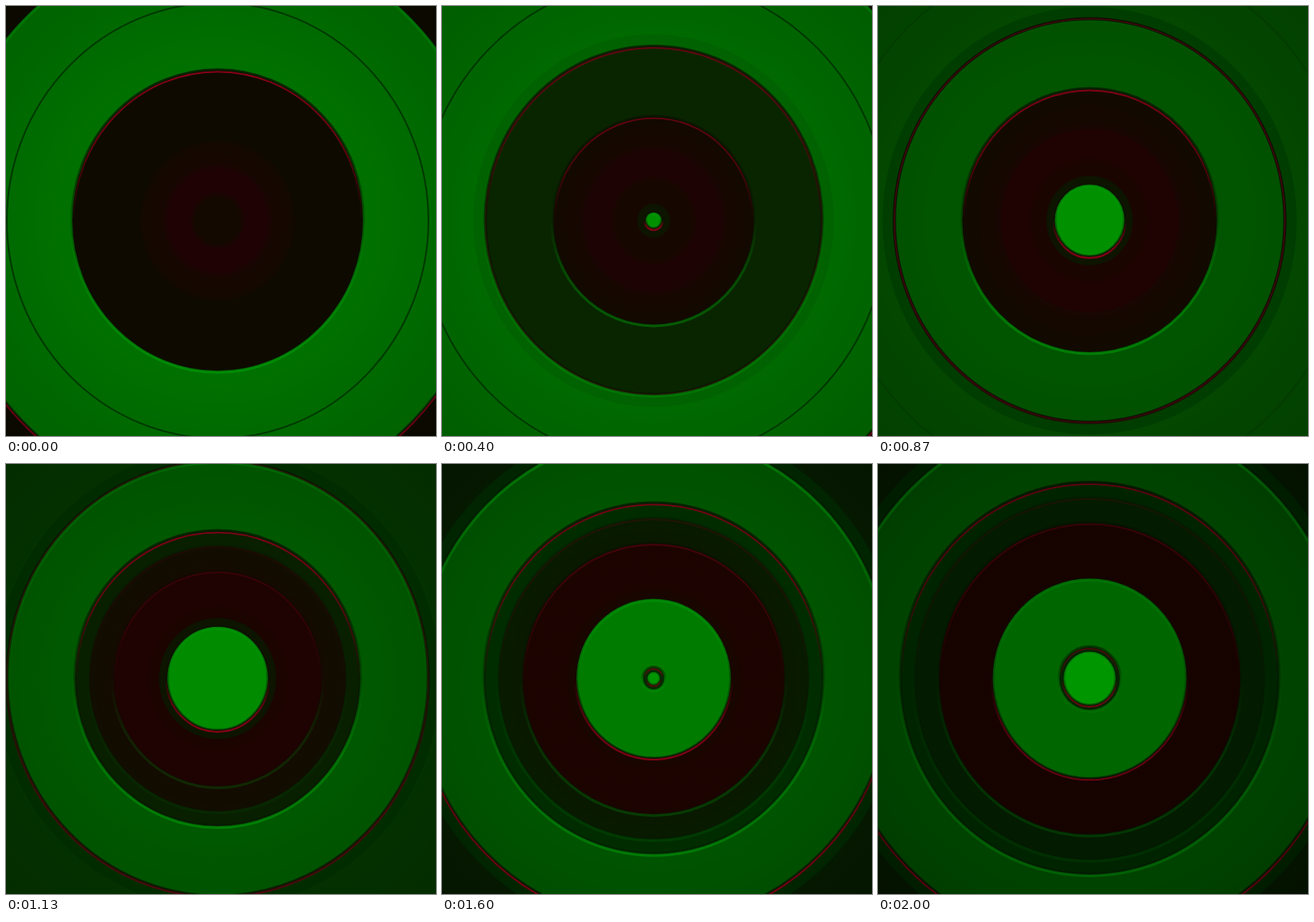
An HTML page with a canvas for the animation above (2.07 s loop, 512x512 px).

```html
<!DOCTYPE html>
<html lang="en">
<head>
<meta charset="utf-8">
<title>Expanding rings</title>
<style>
html, body { margin: 0; width: 100%; height: 100%; overflow: hidden; background: #000; }
canvas { display: block; width: 100vw; height: 100vh; }
</style>
</head>
<body>
<canvas id="stage" width="512" height="512"></canvas>
<script>
const ctx = document.getElementById('stage').getContext('2d');
const LOOP = 2070, FPS = 15, LAST = 30;
const CX = 252, CY = 255.5, ASPECT = 1.033;

const RED = '#930018', GREEN = '#009a08', DARK = '#090b00';
const EARTH = '#130900';

// Discs from outside to inside. r: radius at the start, negative if born later.
// fade: colour changes from a to b between two steps.
// lift: 1 is a raised edge, -1 a sunken one; depth: its strength from step `born`.
const DISCS = [
  { r: 999, a: '#0c0a00' },
  { r: 328, a: '#007000', b: '#061a00', fade: [3, 25], lift: 1, depth: .9 },
  { r: 187, a: '#007000', b: '#002a00', fade: [1, 20] },
  { r: 173, a: '#0e0a00', b: '#005800', fade: [0, 15], lift: k => clamp((k - 12) / 9, -1, 1), depth: .95 },
  { r: 92, a: EARTH, b: '#002e00', fade: [12, 21], lift: -1, depth: .85, born: 2 },
  { r: 75, a: EARTH, b: '#042200', fade: [13, 30], lift: -1, depth: .2, born: 14 },
  { r: 46, a: EARTH, b: '#1c0400', fade: [0, 17], lift: -1, depth: .4, born: 12 },
  { r: -8, a: '#0d1400', b: '#1c0400', fade: [17, 26], glow: true },
  { r: -18, a: '#009000', b: '#007f00', fade: [13, 24], lift: 1, depth: .9, born: 0 },
  { r: -97.5, a: '#003000', lift: -1, depth: .6, born: 18 },
  { r: -102.5, a: '#009600', lift: 1, depth: .7, born: 20, core: true }
];

function clamp(x, lo, hi) {
  return Math.min(hi, Math.max(lo, x));
}

function smooth(from, to, x) {
  const t = clamp((x - from) / (to - from), 0, 1);
  return t * t * (3 - 2 * t);
}

function rgba(hex, alpha) {
  const c = [1, 3, 5].map(i => parseInt(hex.slice(i, i + 2), 16));
  return `rgba(${c.join()},${alpha})`;
}

function mix(a, b, t) {
  const c = [1, 3, 5].map(i => {
    const from = parseInt(a.slice(i, i + 2), 16), to = parseInt(b.slice(i, i + 2), 16);
    return Math.round(from + (to - from) * t);
  });
  return `rgb(${c.join()})`;
}

// Steady growth that slows near the end.
function growth(k) {
  return 4.58 * (k - .024 * Math.max(0, k - 24) ** 2);
}

function oval(r) {
  ctx.beginPath();
  ctx.ellipse(CX, CY, r, r * ASPECT, 0, 0, Math.PI * 2);
}

// side: -1 lights the top, 1 the bottom, 0 the whole outline.
function rim(r, width, hex, alpha, side) {
  if (r <= 0 || alpha <= 0) return;
  const g = ctx.createLinearGradient(0, CY + (side || 1) * r * ASPECT, 0, CY);
  g.addColorStop(0, rgba(hex, alpha));
  g.addColorStop(.5, rgba(hex, alpha * (side ? .7 : 1)));
  g.addColorStop(1, rgba(hex, side ? 0 : alpha));
  ctx.strokeStyle = g;
  ctx.lineWidth = width;
  oval(r);
  ctx.stroke();
}

function relief(r, lift, depth) {
  const flat = 1 - Math.abs(lift);
  const up = depth * Math.max(0, lift), down = depth * Math.max(0, -lift);
  rim(r, 4, DARK, depth * (.3 + .65 * flat), 0);
  rim(r, 1.5, '#500010', depth * flat, 0);
  rim(r + .5, 4, DARK, down * .7, -1);
  rim(r - 1.5, 1.8, RED, down, -1);
  rim(r + 2, 3, GREEN, down * .75, 1);
  rim(r - 2, 3, GREEN, up * .75, -1);
  rim(r + .5, 4, DARK, up * .7, 1);
  rim(r + 1.5, 2, RED, up, 1);
}

// Soft red ring that widens and dies away.
function drawGlow(k) {
  const inner = 30 + 3.1 * k, outer = 62 + 3.7 * k, end = outer + 30;
  const a = .8 * (1 - k / LAST);
  const g = ctx.createRadialGradient(0, 0, 0, 0, 0, end);
  const stops = [[inner - 4, 0], [inner + 4, a], [outer - 4, a], [outer + 4, a * .35], [end, 0]];
  for (const [r, alpha] of stops) g.addColorStop(r / end, rgba('#220005', alpha));
  ctx.save();
  ctx.translate(CX, CY);
  ctx.scale(1, ASPECT);
  ctx.fillStyle = g;
  ctx.beginPath();
  ctx.arc(0, 0, end, 0, Math.PI * 2);
  ctx.fill();
  ctx.restore();
}

// Darker corners, and a general dimming late in the loop.
function drawShade(k) {
  const dim = .2 * smooth(22, LAST, k);
  const g = ctx.createRadialGradient(CX, CY, 190, CX, CY, 360);
  g.addColorStop(0, rgba('#000000', dim));
  g.addColorStop(1, rgba('#000000', dim + .14));
  ctx.fillStyle = g;
  ctx.fillRect(0, 0, 512, 512);
}

function drawDisc(disc, k) {
  const r = disc.r + growth(k);
  if (r <= 0) return;
  ctx.fillStyle = disc.fade ? mix(disc.a, disc.b, smooth(...disc.fade, k)) : disc.a;
  oval(r);
  ctx.fill();
  if (!disc.lift) return;
  const lift = typeof disc.lift === 'function' ? disc.lift(k) : disc.lift;
  const shown = disc.born === undefined ? 1 : smooth(disc.born, disc.born + 6, k);
  relief(r, lift, disc.depth * shown);
}

function draw(k) {
  for (const disc of DISCS) {
    if (disc.core) drawShade(k);
    drawDisc(disc, k);
    if (disc.glow) drawGlow(k);
    if (disc.r === 187) rim(251 + growth(k), 2, '#003200', .85 * (1 - smooth(8, 17, k)), 0);
  }
}

const start = performance.now();
let shown = -1;
function tick() {
  const t = (performance.now() - start) % LOOP;
  const k = Math.min(LAST, Math.floor((t + 3.4) * FPS / 1000));
  if (k !== shown) draw(shown = k);
  requestAnimationFrame(tick);
}
tick();
</script>
</body>
</html>
```
